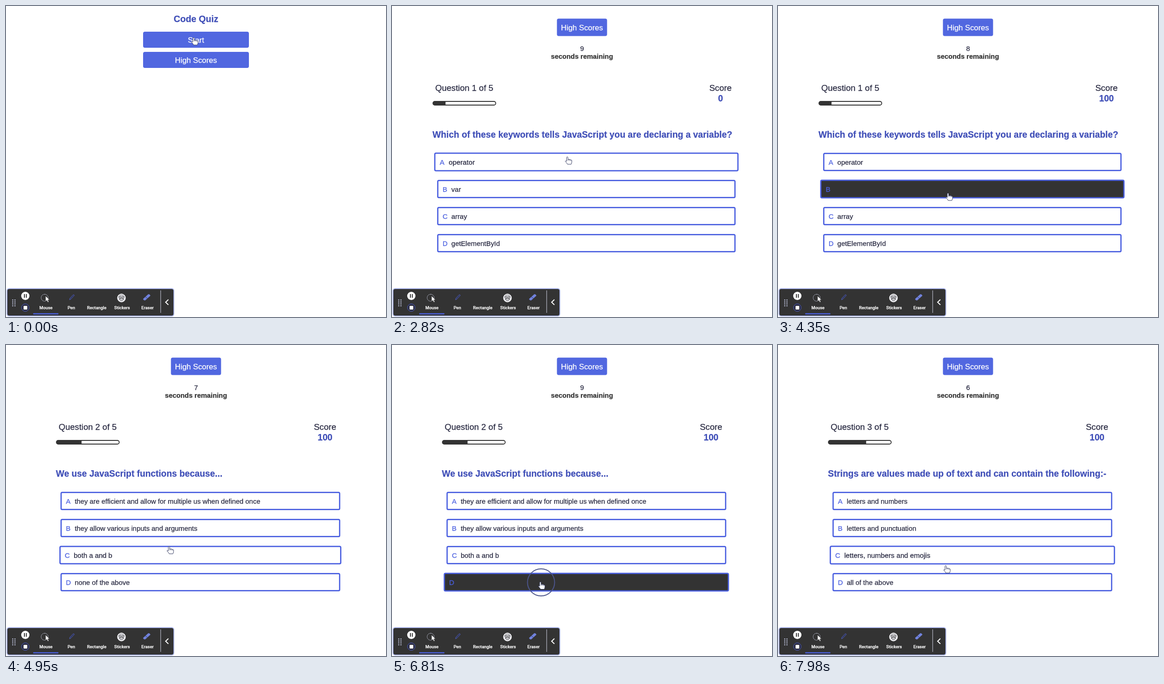
Write an HTML page with a canvas that moves like this. It is 826 by 678 pixels and loops after 8 s.

```html
<!DOCTYPE html>
<html lang="en">
<head>
<meta charset="utf-8">
<title>Code Quiz</title>
<style>
html, body { margin: 0; width: 100%; height: 100%; overflow: hidden; background: #fff; }
canvas { display: block; }
</style>
</head>
<body>
<canvas id="stage" width="826" height="678"></canvas>
<script>
const c = document.getElementById('stage').getContext('2d');
const LOOP = 8000, MID = 422.5;
const BLUE = '#5167e0', HEAD = '#4150b8', LINE = '#4a5fe0', DARK = '#333', INK = '#272840';
const SANS = '"Liberation Sans", Arial, sans-serif';
const LABEL = 'Roboto, sans-serif';

// start time, left edge, half width of the answers, chosen answer and when, texts
const questions = [
  { from: 1740, left: 88, half: 323, chosen: 1, at: 3650,
    text: 'Which of these keywords tells JavaScript you are declaring a variable?',
    answers: ['operator', 'var', 'array', 'getElementById'] },
  { from: 4650, left: 108.5, half: 302.7, chosen: 3, at: 5820,
    text: 'We use JavaScript functions because...',
    answers: ['they are efficient and allow for multiple us when defined once',
      'they allow various inputs and arguments', 'both a and b', 'none of the above'] },
  { from: 6900, left: 108.5, half: 302.7, chosen: -1, at: LOOP,
    text: 'Strings are values made up of text and can contain the following:-',
    answers: ['letters and numbers', 'letters and punctuation',
      'letters, numbers and emojis', 'all of the above'] }
];
const clock = [[0, 10], [2770, 9], [3770, 8], [4770, 7], [5650, 10], [6650, 9], [7650, 6]];
const clicks = [[1440, 1600], [3640, 3850], [5800, 6000], [6690, 6890]];
const path = [
  [0, 408, 69], [300, 408, 69], [800, 407, 75], [1760, 407, 75], [2250, 381.5, 329],
  [3000, 381.5, 329], [3550, 370, 408], [4700, 370, 408], [5350, 324.5, 502],
  [6180, 324.5, 502], [6500, 323, 516.5], [7000, 323, 516.5], [7550, 352, 395],
  [7800, 356, 402], [7870, 360, 450], [7980, 365, 481], [8000, 365, 481]
];

const last = (list, t) => list.filter(e => e[0] <= t).pop();

function pointer(t) {
  const i = Math.max(1, path.findIndex(p => p[0] > t));
  const [t0, x0, y0] = path[i - 1], [t1, x1, y1] = path[i];
  let k = Math.max(0, (t - t0) / (t1 - t0));
  if (t1 - t0 > 200) k = k * k * (3 - 2 * k);
  return [x0 + (x1 - x0) * k, y0 + (y1 - y0) * k];
}

// Share of the last 100 ms the pointer spent on a row, used as the hover transition
function hover(t, y) {
  let n = 0;
  for (let i = 0; i < 5; i++) n += Math.abs(pointer(t - i * 20)[1] - y) <= 23;
  return n / 5;
}

// A hairline stroke gives the slightly heavy font smoothing
function text(s, x, y, size, color, { align = 'left', weight = 400, font = SANS } = {}) {
  c.font = `${weight} ${size}px ${font}`;
  c.textAlign = align;
  c.fillStyle = c.strokeStyle = color;
  c.lineWidth = 0.25;
  c.fillText(s, x, y);
  c.strokeText(s, x, y);
}

function box(x, y, w, h, r, fill, stroke, width = 1) {
  c.beginPath();
  c.roundRect(x, y, w, h, r);
  if (fill) { c.fillStyle = fill; c.fill(); }
  if (stroke) { c.strokeStyle = stroke; c.lineWidth = width; c.stroke(); }
}

function disc(x, y, r, fill, stroke, width = 1) {
  box(x - r, y - r, 2 * r, 2 * r, r, fill, stroke, width);
}

function shape(d, x, y, fill, stroke, width = 1) {
  const p = new Path2D(d);
  c.save();
  c.translate(x, y);
  if (fill) { c.fillStyle = fill; c.fill(p); }
  if (stroke) { c.strokeStyle = stroke; c.lineWidth = width; c.stroke(p); }
  c.restore();
}

function button(label, x, y, w, h) {
  box(x, y, w, h, 4, BLUE);
  text(label, x + w / 2, y + h / 2 + 6, 16.8, '#fff', { align: 'center' });
}

function startPage() {
  text('Code Quiz', 413, 35, 19.6, HEAD, { align: 'center', weight: 700 });
  button('Start', 298, 56, 230, 35);
  button('High Scores', 298, 100, 230, 35);
}

function answer(q, i, t) {
  const y = 340 + 59 * i, s = 1 + 0.02 * hover(t, y);
  const picked = i === q.chosen && t >= q.at;
  c.save();
  c.translate(MID, y);
  c.scale(s, s);
  box(-q.half, -18.7, 2 * q.half, 37.4, 2.5, picked ? DARK : '#fff', LINE, 2.7);
  text('ABCD'[i], 10.4 - q.half, 5.5, 15, LINE);
  if (!picked) text(q.answers[i], 29.6 - q.half, 5.5, 14.95, INK);
  c.restore();
}

function quizPage(q, t) {
  const n = questions.indexOf(q) + 1;
  const score = t >= questions[0].at ? 100 : 0;
  const centre = { align: 'center' }, bold = { align: 'center', weight: 700 };
  const right = 802 - q.left;
  button('High Scores', 358.5, 27.5, 109, 38);
  text(last(clock, t)[1], 413, 97.5, 14.8, INK, centre);
  text('seconds remaining', 413, 115, 14.8, DARK, bold);

  text(`Question ${n} of 5`, q.left + 69, 184.5, 18.6, INK, centre);
  box(q.left + 1, 208, 136.5, 8, 4, '#fff');
  c.save();
  c.clip();
  c.fillStyle = DARK;
  c.fillRect(q.left, 207, 1 + 27.4 * n, 10);
  c.restore();
  box(q.left + 1, 208, 136.5, 8, 4, null, DARK, 1.8);
  text('Score', right, 184.5, 18.6, INK, centre);
  text(score, right, 207.5, 19.3, HEAD, bold);

  text(q.text, q.left, 286.5, 19.35, HEAD, { weight: 700 });
  q.answers.forEach((_, i) => answer(q, i, t));
}

function toolbar() {
  box(1, 615, 365, 62, 6, '#b3bdf2');
  box(3, 617, 361, 58, 4, DARK);
  for (let i = 0; i < 8; i++) disc(14.7 + i % 2 * 4.8, 641 + (i >> 1) * 4.2, 1.2, '#d3d8f4');
  disc(42, 632, 9, '#fff');
  box(39, 628, 2, 8, 0, DARK);
  box(43.2, 628, 2, 8, 0, DARK);
  disc(42, 657.5, 8.2, '#2b2b3c', '#4c5dc4');
  box(38.2, 653.7, 8, 8, 1, '#fff');

  // mouse
  c.setLineDash([2, 1]);
  disc(84, 636, 7.6, null, '#d5d8ee');
  c.setLineDash([]);
  shape('M0 0V12L2.8 9.5 5 14 7 13 5 8.8H8.5Z', 86, 632, '#fff', DARK, 0.7);
  box(59, 669.7, 55, 2.5, 1, LINE);
  // pen
  shape('M-5 5.5L-4 2 3 -5.5Q5 -6 5.5 -4L-2 4Z', 143, 635, '#30354f', '#5263cc', 0.9);
  // stickers
  disc(251, 636.5, 8.8, '#e9e9ef', '#fff');
  shape('M-6 -3H-1V0H-5ZM1 -3H6L5 0H1ZM-5 2H5Q3 6 0 6T-5 2', 251, 636.5, null, DARK, 1);
  shape('M-5 -5Q0 -8 5 -5', 251, 636.5, null, '#666', 1);
  // eraser
  shape('M-8 3L3 -7Q6 -8 8 -4L-3 6Q-7 7 -8 3Z', 306, 635.5, '#7182dc');
  shape('M-3 -1.5L2 2.5', 306, 635.5, null, '#343c70', 1);

  ['Mouse', 'Pen', 'Rectangle', 'Stickers', 'Eraser'].forEach((s, i) =>
    text(s, 86.8 + 55.2 * i, 660.5, 9.4, '#fff', { align: 'center', weight: 500, font: LABEL }));
  box(335.7, 620, 1, 49, 0, '#d5d8e8');
  shape('M6 0L0 5.7 6 11.4', 347, 640, null, '#fff', 2);
}

function draw(t) {
  c.fillStyle = '#fff';
  c.fillRect(0, 0, 826, 678);
  const q = questions.filter(e => e.from <= t).pop();
  q ? quizPage(q, t) : startPage();
  toolbar();
  const [x, y] = pointer(t);
  if (clicks.some(([a, b]) => t >= a && t < b)) disc(x + 1, y + 1, 29.5, null, '#4c558b', 2);
  shape('M-2 1.5Q-2 0 -.5 0T1 1.5V5.5Q6 4.8 9.3 7.5V11.5Q9 14 7.8 16H0Q-2 12.5 -5 9.5-4.5 7.5 -2 9.5Z',
    x, y, '#fff', '#333a60');
  shape('M1 5.5V8.5M4 5.8V8.5M6.7 6.5V8.8', x, y, null, '#333a60', 0.8);
}

function tick(now) {
  draw(now % LOOP);
  requestAnimationFrame(tick);
}
requestAnimationFrame(tick);
</script>
</body>
</html>
```
